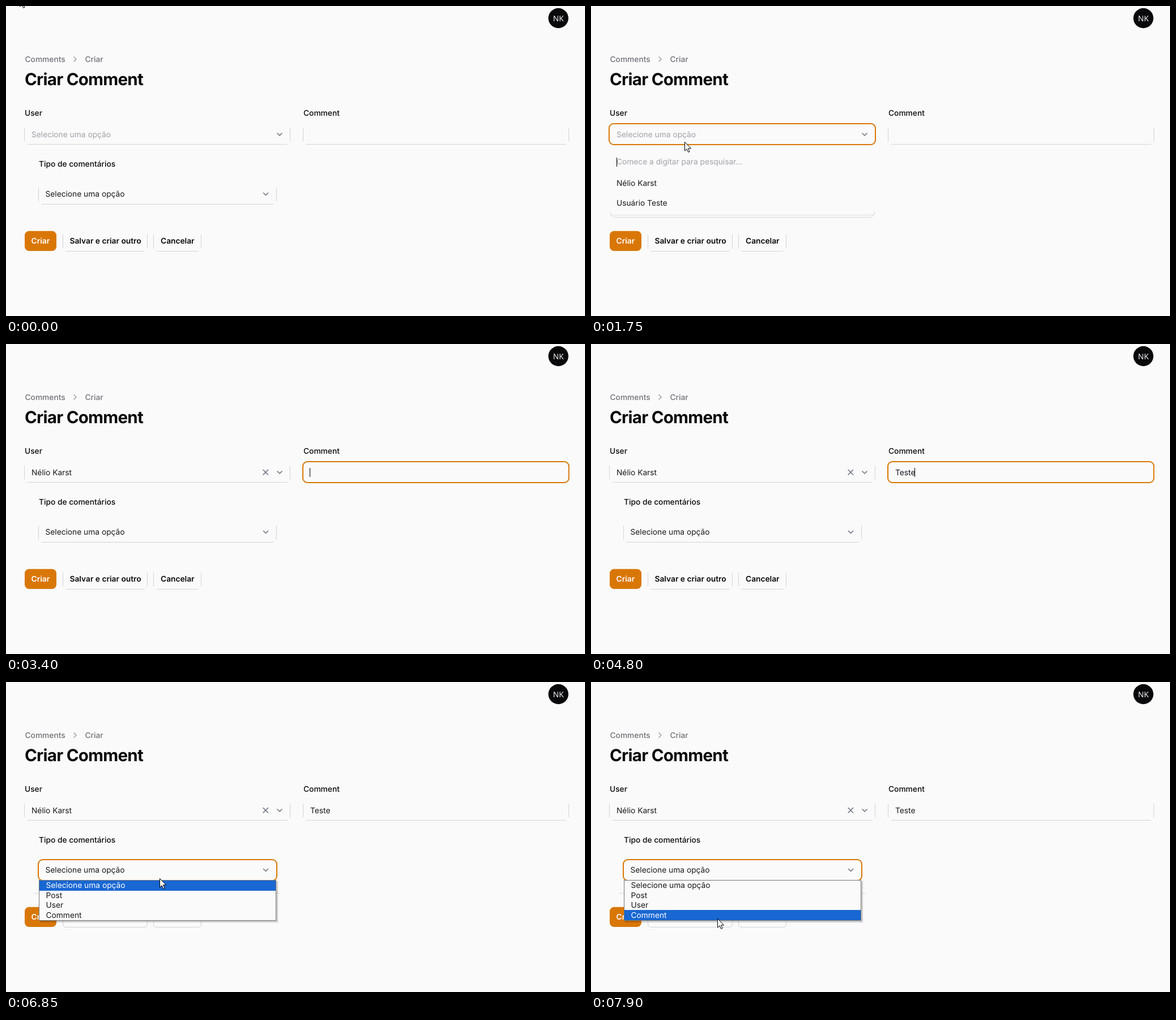
Animation of 1022x548 px, one loop 8000 ms. Source, as an HTML page:

```html
<!DOCTYPE html>
<html lang="pt">
<head>
<meta charset="utf-8">
<title>Criar Comment</title>
<style>
html, body { margin: 0; width: 100%; height: 100%; overflow: hidden; background: #fafafa; }
svg { display: block; font: 13.75px Inter, sans-serif; fill: #18181b; }
text { white-space: pre; text-rendering: geometricPrecision; }
.label { font-weight: 500; fill: #09090b; }
.crumb { font-weight: 500; fill: #71717a; }
.hint { fill: #a1a1aa; }
.button { font-weight: 600; fill: #09090b; }
.title { font-size: 29.5px; font-weight: 700; letter-spacing: -.025em; fill: #09090b; }
.line { fill: none; stroke: #d4d4d8; }
.icon { fill: none; stroke: #6b7280; stroke-width: 1.6; stroke-linecap: round; stroke-linejoin: round; }
.ring { fill: #fafafa; stroke: #d97706; stroke-width: 2; }
.caret { fill: #000; }
</style>
</head>
<body>
<svg width="1022" height="548" viewBox="0 0 1022 548">
  <circle cx="975" cy="21.5" r="17.7" fill="#09090b"/>
  <text x="975" y="27" text-anchor="middle" fill="#fff" font-family="Open Sans, sans-serif">NK</text>

  <text class="crumb" x="33.5" y="99">Comments</text>
  <path class="icon" style="stroke:#a1a1aa" d="M120 90l4 4-4 4"/>
  <text class="crumb" x="139.5" y="99">Criar</text>
  <text class="title" x="33" y="140">Criar Comment</text>
  <text class="label" x="33" y="194">User</text>
  <text class="label" x="525" y="194">Comment</text>
  <text class="label" x="58" y="284">Tipo de comentários</text>

  <g id="boxes" class="line"></g>
  <path class="line" data-show="6150-8000" d="M50 373.5h7M478 373.5h6"/>

  <rect class="ring" data-show="800-3300" x="32" y="208" width="470" height="37" rx="8"/>
  <rect class="ring" data-show="3300-6200" x="524" y="208" width="469.500" height="37" rx="8"/>
  <rect class="ring" data-show="6200-8000" x="57" y="314" width="421" height="37" rx="8"/>

  <text class="hint" data-show="0-2200" x="45" y="232">Selecione uma opção</text>
  <g data-show="2200-8000">
    <text x="45" y="232">Nélio Karst</text>
    <path class="icon" d="M454 222.5l8.5 8.5m0-8.5l-8.5 8.5"/>
  </g>
  <path class="icon" d="M479 225l4 4 4-4M454.500 330.500l4 4 4-4"/>
  <text id="typed" x="537" y="232"></text>
  <rect id="typedCaret" class="caret" data-show="3350-3800 3950-5200 5700-6150" y="219" width="1" height="16"/>
  <text x="69.5" y="337">Selecione uma opção</text>

  <rect x="33" y="397.700" width="56" height="35.300" rx="7.800" fill="#d97706"/>
  <text class="button" style="fill:#fff" x="44.500" y="420">Criar</text>
  <text class="button" x="112.500" y="420">Salvar e criar outro</text>
  <text class="button" x="273" y="420">Cancelar</text>

  <g data-show="850-2200">
    <rect x="32" y="250" width="470" height="124" fill="#fafafa"/>
    <path class="line" stroke-opacity=".7" d="M36 369.500H499"/>
    <path class="line" d="M33.500 364q1 9.500 9 9.500H491.500q8 0 9-9.500"/>
    <text class="hint" x="45" y="280">Comece a digitar para pesquisar...</text>
    <text x="45" y="318">Nélio Karst</text>
    <text x="45" y="353">Usuário Teste</text>
    <rect class="caret" data-show="850-1200 1700-2200" x="45" y="268" width="1" height="16"/>
  </g>

  <g data-show="6150-8000">
    <path d="M477 352h3v73H60v-3h417z" fill="#000" fill-opacity=".18"/>
    <path class="line" data-show="6150-6250" d="M57.500 355v65"/>
    <g data-show="6250-8000">
      <rect x="58.500" y="350.500" width="418" height="71" fill="#fafafa" stroke="#767676"/>
      <g id="options"></g>
    </g>
  </g>

  <path id="pointer" data-show="0-3200 5550-8000" fill="#fff" stroke="#000"
    d="M.5 .5v15.600l3.600-3.400 2.500 5.700 2.400-1-2.400-5.600h4.900z"/>
</svg>
<script>
const LOOP = 8000, STEP = 50;
const $ = id => document.getElementById(id);

// Outlines: left, right, top of the sides, bottom, and whether corners join later
const box = (l, r, top, b, joins) => {
  const corners = `M${l} ${b - 6}q0 6 6 6M${r} ${b - 6}q0 6-6 6`;
  return `<path d="M${l} ${top}V${b - 5}M${r} ${top}V${b - 5}M${l + 5} ${b}H${r - 5}"/>` +
    (joins ? `<path data-show="6150-8000" d="${corners}"/>` : "");
};
$("boxes").innerHTML =
  box(32.5, 501.5, 215, 244.5) + box(524.5, 993.5, 215, 244.5) +
  box(57.5, 477.5, 321, 350.5, true) +
  box(100.5, 249.5, 404, 433.5, true) + box(260.5, 344.5, 404, 433.5, true);

const ROW = 17.5, FIRST = 351;
$("options").innerHTML = ["Selecione uma opção", "Post", "User", "Comment"].map((name, i) =>
  `<rect x="59" y="${Math.round(FIRST + i * ROW - .1)}" width="417" height="18" fill="#1967d2"/>
   <text x="70.5" y="${Math.round(364 + i * ROW)}">${name}</text>`).join("");
const [bars, names] = ["rect", "text"].map(tag => [...$("options").querySelectorAll(tag)]);

// Pointer tip: time, x, y
const path = [
  [0, 24, -15], [250, 168, 257], [350, 168, 257], [550, 170, 229], [1550, 170, 229],
  [1750, 165, 240], [2150, 85, 312], [2600, 85, 312], [3200, 545, 245],
  [5500, 588, 246], [6000, 287, 333], [6650, 287, 333], [7200, 243, 371],
  [7450, 243, 371], [7500, 240, 379], [7900, 223, 418], [LOOP, 223, 418]
];
const keyTimes = [3950, 4300, 4550, 4700, 4800];

const timed = [...document.querySelectorAll("[data-show]")].map(el => ({
  el, spans: el.dataset.show.split(" ").map(s => s.split("-").map(Number))
}));

function tipAt(t) {
  const i = path.findIndex(p => p[0] > t);
  const [t0, x0, y0] = path[i - 1], [t1, x1, y1] = path[i];
  const k = (t - t0) / (t1 - t0);
  return [Math.round(x0 + (x1 - x0) * k), Math.round(y0 + (y1 - y0) * k)];
}

function draw(t) {
  for (const { el, spans } of timed)
    el.style.display = spans.some(([a, b]) => t >= a && t < b) ? "" : "none";

  const [x, y] = tipAt(t);
  $("pointer").setAttribute("transform", `translate(${x} ${y})`);

  const typed = $("typed");
  typed.textContent = "Teste".slice(0, keyTimes.filter(k => t >= k).length);
  const width = typed.textContent ? typed.getComputedTextLength() : 0;
  $("typedCaret").setAttribute("x", Math.round(536 + width));

  const active = Math.max(0, Math.min(3, Math.floor((y - FIRST) / ROW)));
  bars.forEach((bar, i) => bar.style.display = i === active ? "" : "none");
  names.forEach((name, i) => name.style.fill = i === active ? "#fff" : "");
}

const start = performance.now();
function tick() {
  const t = (performance.now() - start) % LOOP;
  draw(Math.floor(t / STEP) * STEP);
  requestAnimationFrame(tick);
}
tick();
</script>
</body>
</html>
```
